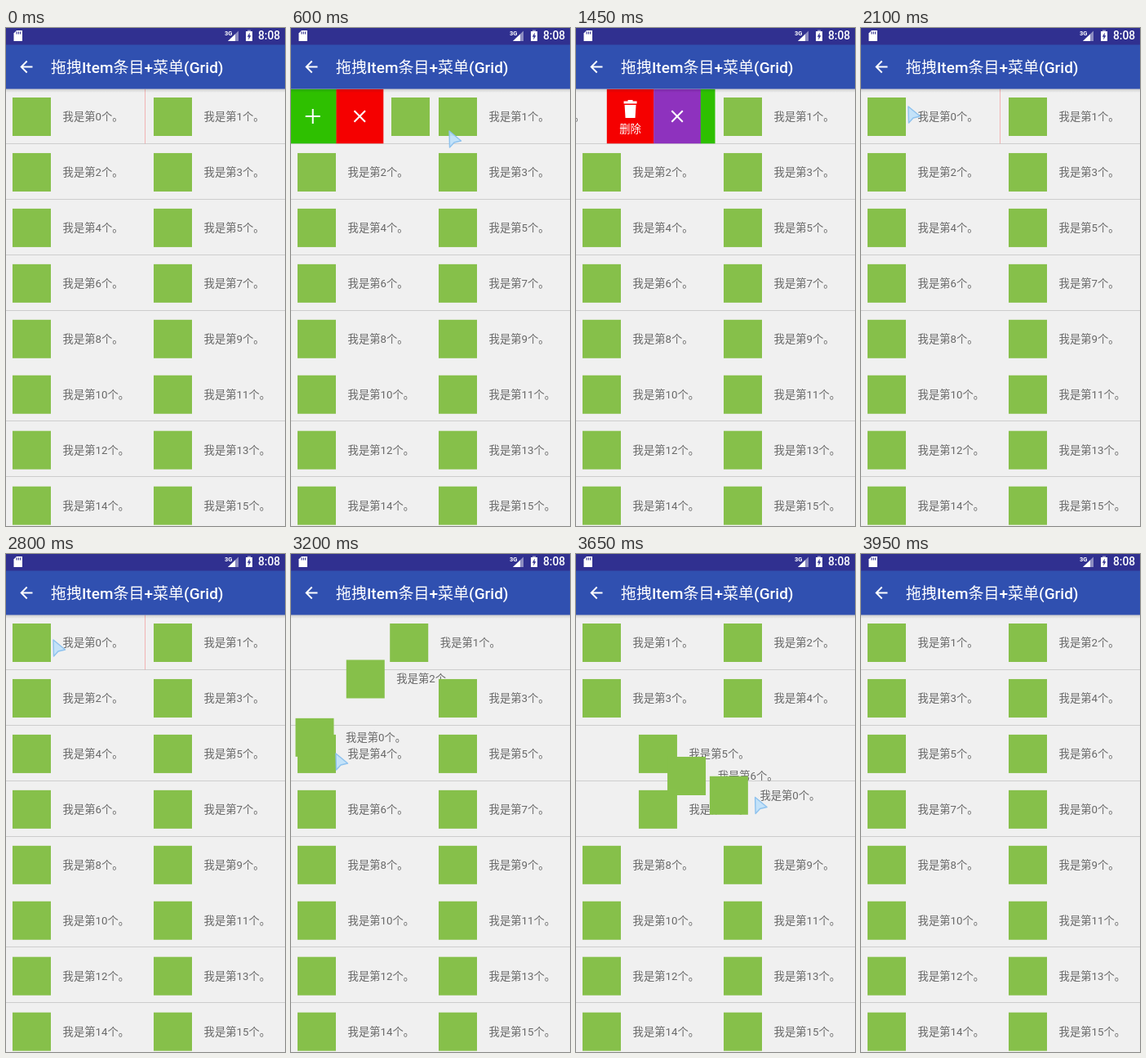
An HTML page with a canvas that plays this animation: 342 by 609 pixels, repeating every 4000 ms.

```html
<!DOCTYPE html>
<html lang="zh">
<head>
<meta charset="utf-8">
<title>Grid</title>
<style>
  html, body { margin: 0; width: 100%; height: 100%; overflow: hidden; background: #f0f0f0; }
  canvas { display: block; width: 342px; height: 609px; }
</style>
</head>
<body>
<canvas id="stage"></canvas>
<script>
const W = 342, H = 609, LOOP = 4000, STEP = 50;
const COL = 173, ROW = 67.95;
const CELL = { x: -2, y: 74.5, w: 172.5, h: 67 };
const MENU_W = 57.5;
const DRAG_START = 2950, LEAD = 50;
const FONT = 'Roboto, "Noto Sans CJK SC", "Noto Sans CJK", sans-serif';
const GREEN = '#2ec000', RED = '#f50000', PURPLE = '#8e32be';
const BAR = '#303090', WHITE = '#fff';

const canvas = document.getElementById('stage');
const ratio = window.devicePixelRatio || 1;
canvas.width = W * ratio;
canvas.height = H * ratio;
const ctx = canvas.getContext('2d');
ctx.scale(ratio, ratio);

const ramp = (t, from, to) => Math.min(1, Math.max(0, (t - from) / (to - from)));
const ease = p => (1 - Math.cos(Math.PI * p)) / 2;
const mix = (a, b, p) => a.map((v, i) => v + (b[i] - v) * p);
const slot = n => [(n % 2) * COL, Math.floor(n / 2) * ROW];

// Drag the first item down, across, then into its new slot
const dragPath = [
  { t: DRAG_START, at: [0, 0] },
  { t: 3250, at: [-3, 139] },
  { t: 3400, at: [121, 175] },
  { t: 3450, at: [133, 164] },
  { t: 3800, at: slot(7) }
];

function dragOffset(t) {
  return dragPath.reduce((pos, key, i) =>
    i ? mix(pos, key.at, ramp(t, dragPath[i - 1].t, key.t)) : key.at, [0, 0]);
}

// Open and close the left menu, then the right one
function swipeOffset(t) {
  const left = ramp(t, 150, 400) - ramp(t, 650, 850);
  const right = ramp(t, 1150, 1540) - ramp(t, 1700, 2000);
  return MENU_W * (2 * left - 3 * right);
}

// Pairs give way one after another as the dragged item passes
function shiftedSlot(n, t) {
  if (n > 7) return slot(n);
  const pair = Math.min(2, Math.floor((n - 1) / 2));
  const start = 3100 + 166 * pair ** 1.3;
  return mix(slot(n), slot(n - 1), ease(ramp(t, start, start + 250)));
}

function pointerAt(t) {
  if (t >= 2100) {
    const [dx, dy] = dragOffset(t + LEAD);
    return [57 + dx, (t < 2800 ? 95 : 104) + dy];
  }
  const grab = t < 1150 ? 78 : 57;
  const swing = Math.sin(Math.PI * (t - 600) / 500) ** 2;
  return [grab + swipeOffset(t), 125 - 30 * ramp(t, 600, 2100) + 62 * swing];
}

function rect(x, y, w, h, color) {
  ctx.fillStyle = color;
  ctx.fillRect(x, y, w, h);
}

function poly(points, color) {
  ctx.beginPath();
  points.forEach(([x, y]) => ctx.lineTo(x, y));
  ctx.closePath();
  ctx.fillStyle = color;
  ctx.fill();
}

function label(str, x, y, size, color, weight = 400, align = 'left') {
  ctx.font = `${weight} ${size}px ${FONT}`;
  ctx.textAlign = align;
  ctx.fillStyle = color;
  ctx.fillText(str, x, y);
}

function item(n, x, y) {
  rect(x + 8, y + 85, 47, 47, '#86c04a');
  label(`我是第${n}个。`, x + 69.6, y + 113, 13.3, '#686868');
}

function plus(x, y, r = 9, angle = 0) {
  ctx.save();
  ctx.translate(x, y);
  ctx.rotate(angle);
  rect(-r, -1, 2 * r, 2, WHITE);
  rect(-1, -r, 2, 2 * r, WHITE);
  ctx.restore();
}

const cross = (x, y) => plus(x, y, 9.5, Math.PI / 4);

function trash(x, y) {
  rect(x - 3, y - 20, 6, 2, WHITE);
  rect(x - 8, y - 18.5, 16, 3, WHITE);
  poly([[x - 7, y - 14], [x + 7, y - 14], [x + 6, y + 2], [x - 6, y + 2]], WHITE);
  label('删除', x, y + 20, 13.3, WHITE, 400, 'center');
}

function menuBlock(x, color, icon) {
  rect(x, CELL.y, MENU_W + 0.3, CELL.h, color);
  icon(x + MENU_W / 2, 108);
}

function swipeItem(dx) {
  const left = CELL.x + dx, right = left + CELL.w;
  ctx.save();
  ctx.beginPath();
  ctx.rect(CELL.x, CELL.y, CELL.w, CELL.h);
  ctx.clip();
  item(0, dx, 0);
  menuBlock(left - 2 * MENU_W, GREEN, plus);
  menuBlock(left - MENU_W, RED, cross);
  menuBlock(right, RED, trash);
  menuBlock(right + MENU_W, PURPLE, cross);
  menuBlock(right + 2 * MENU_W, GREEN, plus);
  ctx.restore();
}

function dividers() {
  for (let row = 1; row < 8; row++) {
    if (row !== 5) rect(0, Math.floor(74 + row * 67.8), W, 1, '#cdcdcd');
  }
}

function statusBar() {
  rect(0, 0, W, 20.5, BAR);

  // Memory card
  poly([[13, 3], [20, 3], [20, 16], [9.5, 16], [9.5, 6.5]], WHITE);
  for (let i = 0; i < 3; i++) rect(12.5 + 2.3 * i, 4.5, 1.1, 3, BAR);

  // Signal, battery, clock
  poly([[285, 3.5], [285, 16], [272, 16]], 'rgba(255,255,255,.45)');
  poly([[281, 7.5], [281, 16], [272, 16]], WHITE);
  label('3G', 268, 9, 7.5, WHITE, 700);
  rect(296, 2.5, 4, 1.5, 'rgba(255,255,255,.5)');
  rect(294, 4, 8, 12, WHITE);
  poly([[298.8, 5.5], [295.8, 10.7], [297.6, 10.7], [297.2, 14.5], [300.3, 9.3], [298.5, 9.3]], BAR);
  label('8:08', 309, 14, 13.8, WHITE, 500);
}

function toolbar() {
  const shade = ctx.createLinearGradient(0, 74, 0, 79);
  shade.addColorStop(0, 'rgba(0,0,0,.16)');
  shade.addColorStop(1, 'rgba(0,0,0,0)');
  rect(0, 74, W, 5, shade);
  rect(0, 20, W, 54.5, '#3050b0');

  // Back arrow
  ctx.strokeStyle = WHITE;
  ctx.lineWidth = 1.9;
  ctx.lineJoin = 'miter';
  ctx.beginPath();
  ctx.moveTo(32.5, 47.5);
  ctx.lineTo(19, 47.5);
  ctx.moveTo(25.7, 40.5);
  ctx.lineTo(18.7, 47.5);
  ctx.lineTo(25.7, 54.5);
  ctx.stroke();
  label('拖拽Item条目+菜单(Grid)', 55, 55, 19, WHITE, 500);
}

function pointer(t) {
  if (t < 50 || t >= 3800) return;
  ctx.save();
  ctx.translate(...pointerAt(t));
  poly([[1, 1], [15.5, 13], [7, 15], [1.5, 21]], 'rgba(190,224,250,.9)');
  ctx.strokeStyle = '#8ec2ee';
  ctx.lineWidth = 1.4;
  ctx.lineJoin = 'round';
  ctx.stroke();
  ctx.restore();
}

function draw(t) {
  rect(0, 0, W, H, '#f0f0f0');
  dividers();
  for (let n = 1; n < 16; n++) item(n, ...shiftedSlot(n, t));
  if (t < DRAG_START) swipeItem(swipeOffset(t));
  else item(0, ...dragOffset(t));
  toolbar();
  statusBar();
  pointer(t);
}

const start = performance.now();
function frame() {
  const t = (performance.now() - start) % LOOP;
  draw(Math.floor(t / STEP) * STEP);
  requestAnimationFrame(frame);
}
frame();
</script>
</body>
</html>
```
